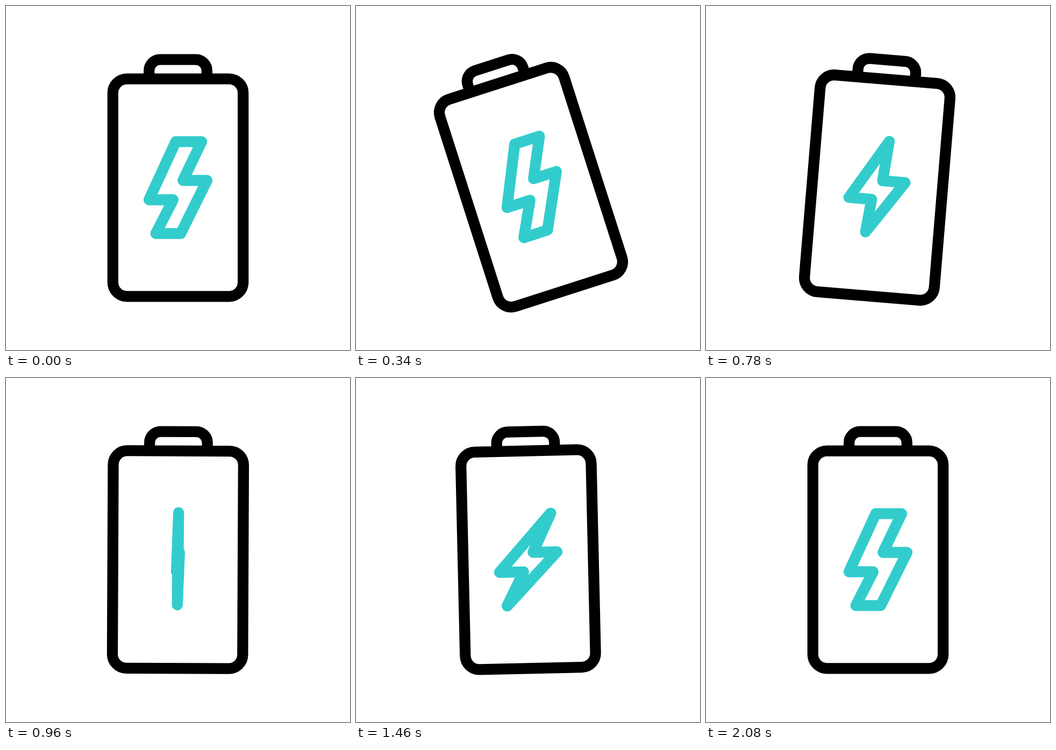
An HTML page with a canvas for the animation above (2.1 s loop, 640 by 640 pixels).

```html
<!DOCTYPE html>
<html lang="en">
<head>
<meta charset="utf-8">
<title>Battery</title>
<style>
  html, body { margin: 0; width: 100%; height: 100%; overflow: hidden; background: #fff; }
  canvas { display: block; width: 100vw; height: 100vh; object-fit: contain; }
</style>
</head>
<body>
<canvas id="stage" width="640" height="640"></canvas>
<script>
const ctx = document.getElementById('stage').getContext('2d');
const LOOP = 2100;
const MID = 320;

// Bolt outlines, clockwise from the top left corner
const wide = [[315.8, 252.4], [364, 252.4], [329.3, 324.5], [374, 324.5],
              [325, 423.3], [278.7, 423.3], [311, 360.5], [266, 360.5]];

function pinch(top, bottom) {
  const p = wide.slice();
  p[0] = p[1] = top;
  p[4] = p[5] = bottom;
  return p;
}

const slim = pinch([336.2, 250.4], [304.2, 422]);
const lean = pinch(wide[1], wide[5]);
const flipped = slim.map(([x, y]) => [2 * MID - x, y]);

const swing = [[0, [0]], [430, [-20]], [735, [5]], [1203, [-5]], [1592, [0]]];
const morph = [[0, wide], [350, wide], [510, slim], [735, slim],
               [1203, flipped], [1440, lean], [1452, lean], [1600, wide]]
  .map(([t, pts]) => [t, pts.flat()]);

const ease = p => p * p * (3 - 2 * p);

// Eased value list at time t
function sample(keys, t) {
  const i = keys.findIndex(k => k[0] > t);
  if (i < 0) return keys[keys.length - 1][1];
  const [t0, a] = keys[i - 1];
  const [t1, b] = keys[i];
  const p = ease((t - t0) / (t1 - t0));
  return a.map((v, n) => v + (b[n] - v) * p);
}

function drawBattery() {
  ctx.strokeStyle = '#000';
  ctx.beginPath();
  ctx.roundRect(198.8, 135.6, 242.4, 404.7, 26);
  ctx.moveTo(266.2, 134);
  ctx.lineTo(266.2, 120.5);
  ctx.arcTo(266.2, 99.7, 287, 99.7, 20.8);
  ctx.lineTo(353, 99.7);
  ctx.arcTo(373.8, 99.7, 373.8, 120.5, 20.8);
  ctx.lineTo(373.8, 134);
  ctx.stroke();
}

function drawBolt(v) {
  ctx.strokeStyle = '#33cccc';
  ctx.beginPath();
  for (let i = 0; i < v.length; i += 2) ctx.lineTo(v[i], v[i + 1]);
  ctx.closePath();
  ctx.stroke();
}

function draw(t) {
  ctx.setTransform(1, 0, 0, 1, 0, 0);
  ctx.fillStyle = '#fff';
  ctx.fillRect(0, 0, 640, 640);
  ctx.translate(MID, MID);
  ctx.rotate(sample(swing, t)[0] * Math.PI / 180);
  ctx.translate(-MID, -MID);
  ctx.lineWidth = 20.3;
  ctx.lineJoin = 'round';
  drawBattery();
  drawBolt(sample(morph, t));
}

const start = performance.now();
function tick() {
  draw((performance.now() - start) % LOOP);
  requestAnimationFrame(tick);
}
tick();
</script>
</body>
</html>
```
